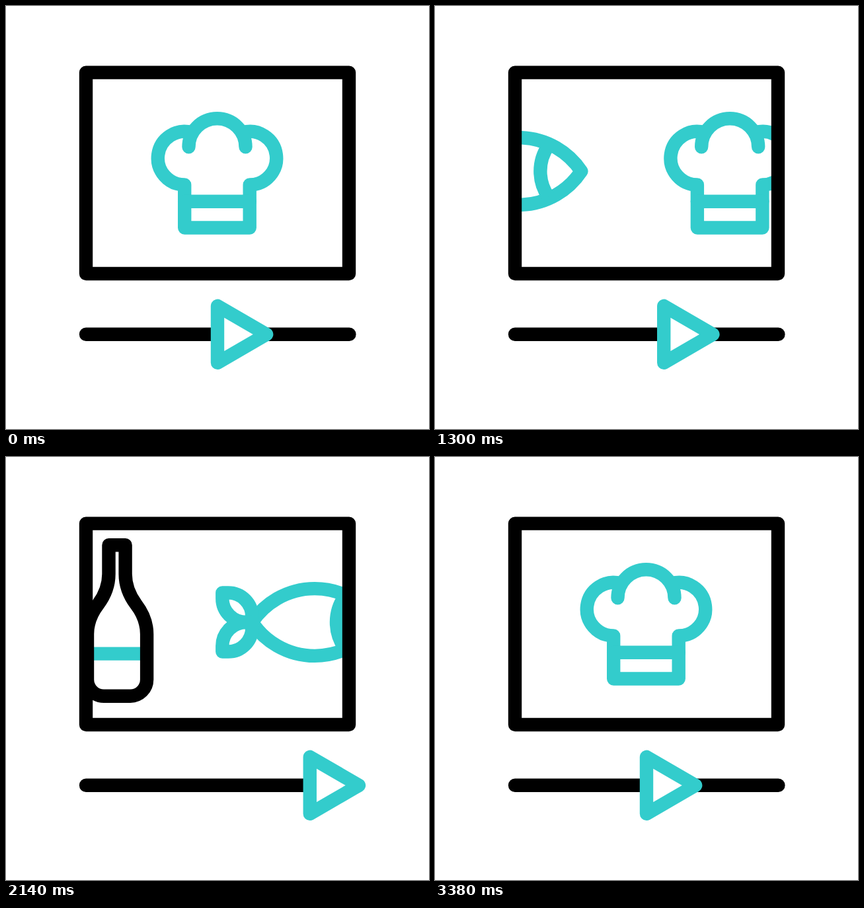
Recreate the animation shown at these times as an HTML page. Size 640x640 px, loop 3.54 s.

```html
<!DOCTYPE html>
<html lang="en">
<head>
<meta charset="utf-8">
<title>Cooking video</title>
<style>
  html, body { margin: 0; width: 100%; height: 100%; overflow: hidden; background: #fff; }
  svg { display: block; width: 100vw; height: 100vh; }
  .ink, .tint { fill: none; stroke-width: 20.4; stroke-linecap: round; stroke-linejoin: round; }
  .ink { stroke: #000; }
  .tint { stroke: #33cccc; }
  .flat { stroke-linecap: butt; }
  #play { fill: #fff; }
</style>
</head>
<body>
<svg viewBox="0 0 640 640">
  <defs>
    <clipPath id="screen"><rect x="131" y="110" width="378" height="285"/></clipPath>
    <path id="fin" d="M-95 250 V241.5 A36 36 0 0 0 -131 205.4 H-140 V214 A36 36 0 0 0 -104 250 Z"/>
  </defs>

  <g clip-path="url(#screen)">
    <g id="reel">
      <g class="tint">
        <path d="M281 191.4 A40.3 40.3 0 1 0 270.2 270.5 V335.5 H368.7 V270.5 A40.3 40.3 0 1 0 358 191.4"/>
        <path d="M276.5 213.3 A43 43 0 0 1 362.5 213.3"/>
        <path d="M270.2 295.8 H368.7"/>
      </g>
      <g class="tint">
        <path d="M-95 250 A113.8 113.8 0 0 1 94.6 250 A113.8 113.8 0 0 1 -95 250 Z"/>
        <path class="flat" d="M45 211 A68 68 0 0 0 45 289"/>
        <use href="#fin"/>
        <use href="#fin" transform="matrix(1 0 0 -1 0 500)"/>
      </g>
      <g transform="translate(-519 0)">
        <path class="tint flat" d="M174.7 297.6 H264.8"/>
        <path class="ink" d="M207.2 133.2 H232.3 V177 C232.3 195 239.5 211 248.5 223
          C258.5 236 264.8 252 264.8 268 V336.7 A25 25 0 0 1 239.8 361.7 H199.7
          A25 25 0 0 1 174.7 336.7 V268 C174.7 252 181 236 191 223 C200 211 207.2 195 207.2 177 Z"/>
      </g>
    </g>
  </g>

  <path class="ink" d="M121 100.6 H519 V405 H121 Z"/>
  <path class="ink" d="M121 496.8 H519.4"/>
  <g id="sparks" class="tint"></g>
  <path id="play" class="tint"/>
</svg>
<script>
  const LOOP = 3540, STEP = 20;
  const REEL_END = 519, KNOB_START = -16, KNOB_END = 157;
  const RAYS = [
    [543, 464.8, 600.5, 434.7],
    [547, 503.1, 616, 498.8],
    [542, 543.9, 592, 559.7]
  ];

  const byId = id => document.getElementById(id);
  const reel = byId('reel'), play = byId('play'), sparks = byId('sparks');
  const mix = (a, b, k) => a + (b - a) * k;

  // smooth ease in and out between two times
  function ease(t, from, to) {
    const u = Math.min(1, Math.max(0, (t - from) / (to - from)));
    return u * u * (3 - 2 * u);
  }

  const press = (t, start) => ease(t, start, start + 140) - ease(t, start + 140, start + 280);

  const lines = RAYS.map(() => {
    const line = document.createElementNS('http://www.w3.org/2000/svg', 'path');
    sparks.appendChild(line);
    return line;
  });

  function drawSparks(t, start, downward) {
    const tail = ease(t, start + 80, start + 260);
    const head = ease(t, start, start + 160);
    // turned a quarter so the rays leave below the button
    sparks.setAttribute('transform', downward ? 'matrix(0 1 -1 0 857 -10)' : '');
    sparks.style.display = head - tail > 0.001 ? '' : 'none';
    RAYS.forEach(([x1, y1, x2, y2], i) => {
      const at = k => mix(x1, x2, k) + ' ' + mix(y1, y2, k);
      lines[i].setAttribute('d', `M${at(tail)} L${at(head)}`);
    });
  }

  function draw(t) {
    const forth = ease(t, 740, 2480);
    const shift = REEL_END * (forth - ease(t, 2740, 3380));
    reel.setAttribute('transform', `translate(${shift} 0)`);

    const knob = KNOB_START * ease(t, 480, 740)
      + (KNOB_END - KNOB_START) * forth
      - KNOB_END * ease(t, 2784, 3224);
    const p = press(t, 200) + press(t, 2480);
    const x = 320 + knob;
    play.setAttribute('d',
      `M${x} ${mix(453.8, 461.8, p)} V${mix(539.8, 525.8, p)} L${x + mix(74.2, 48.8, p)} 496.8 Z`);

    const early = t < 1000;
    drawSparks(t, early ? 200 : 2480, early);
  }

  const begin = performance.now();
  function tick() {
    const t = (performance.now() - begin) % LOOP;
    draw(Math.floor(t / STEP) * STEP);
    requestAnimationFrame(tick);
  }
  draw(0);
  requestAnimationFrame(tick);
</script>
</body>
</html>
```
